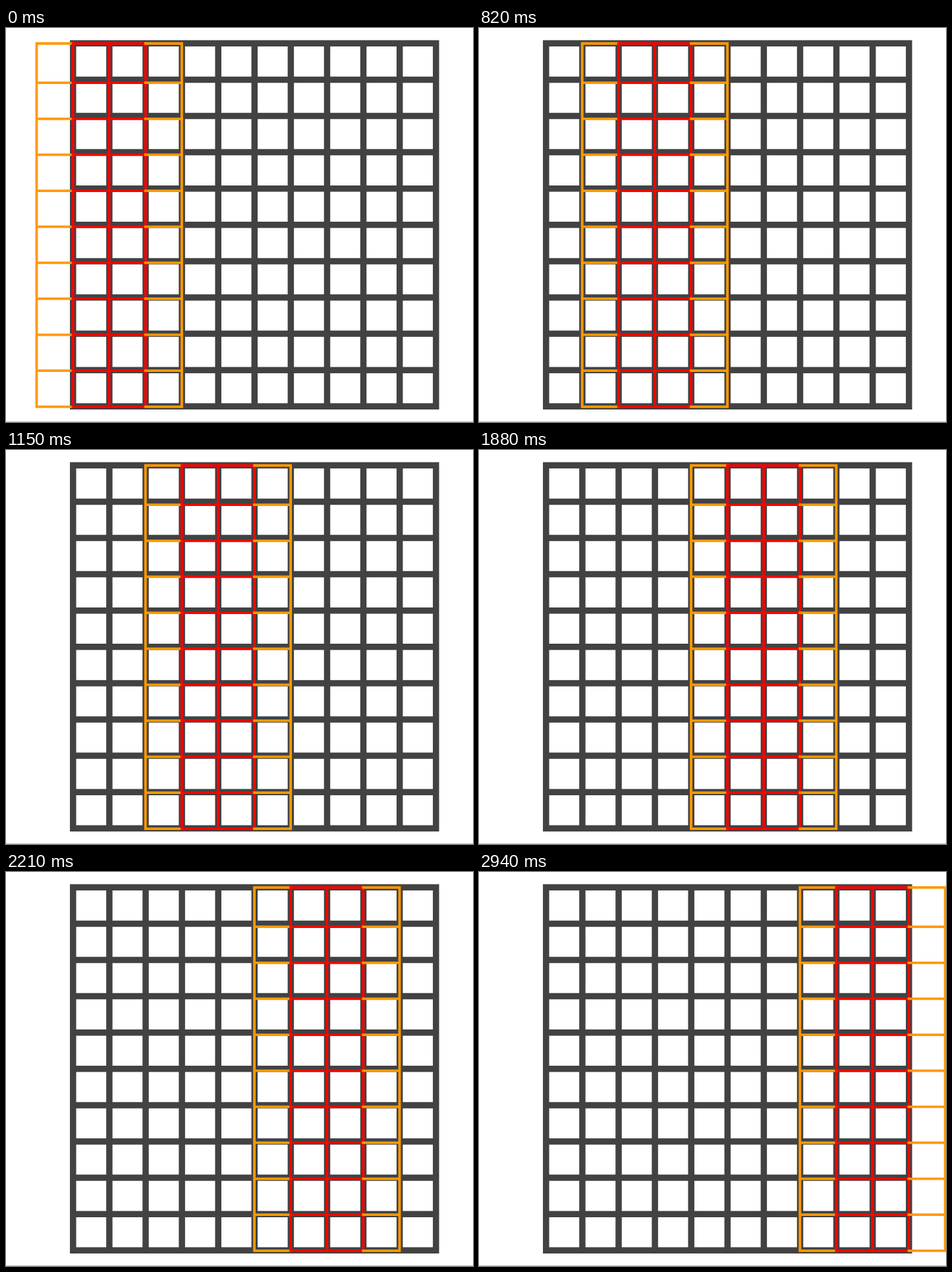
An HTML page that plays this animation: 709x598 px, repeating every 3540 ms.

```html
<!DOCTYPE html>
<html lang="en">
<head>
<meta charset="utf-8">
<title>Sliding columns on a grid</title>
<style>
  html, body { margin: 0; width: 100%; height: 100%; overflow: hidden; background: #fff; }
  svg { display: block; }
  path { fill: none; }
</style>
</head>
<body>
<svg width="709" height="598" viewBox="0 0 709 598">
  <rect y="597" width="709" height="1" fill="#c0c0c0"/>
  <path id="grid" stroke="#424242" stroke-width="9.5"/>
  <g id="cursor" stroke-width="3.8">
    <path id="left" stroke="#ff9900"/>
    <path id="middle" stroke="#ff0000"/>
    <path id="right" stroke="#ff9900"/>
  </g>
</svg>
<script>
{
  const STEP = 55.1, GRID_X = 101.8, GRID_Y = 23.3, CURSOR_X = 46.5, HALF = 1.9;
  const STARTS = [0, 550, 820, 1150, 1550, 1880, 2210, 2540, 2940];
  const LOOP = 3540;

  const byId = id => document.getElementById(id);
  const lines = Array.from({ length: 11 }, (_, i) => i);
  const across = (y, x1, x2) => `M${x1} ${y}H${x2}`;
  const down = (x, y1, y2) => `M${x} ${y1}V${y2}`;
  const draw = (id, parts) => byId(id).setAttribute('d', parts.join(''));

  const size = STEP * 10, edge = 4.75;
  draw('grid', lines.flatMap(i => [
    across(GRID_Y + i * STEP, GRID_X - edge, GRID_X + size + edge),
    down(GRID_X + i * STEP, GRID_Y - edge, GRID_Y + size + edge)
  ]));

  // The top row of the cursor is taller than the others.
  const rows = lines.map(i => i ? 83.2 + (i - 1) * 54.62 : 23.5);
  const railTop = rows[0] - HALF, railBottom = rows[10] + HALF;
  const column = i => i * STEP;
  const rungs = (from, to) => rows.map(y => across(y, column(from) - HALF, column(to) + HALF));
  const rail = i => down(column(i), railTop, railBottom);

  draw('left', [...rungs(0, 1), rail(0)]);
  draw('middle', [...rungs(1, 3), rail(1), rail(2), rail(3)]);
  draw('right', [...rungs(3, 4), rail(4)]);

  const cursor = byId('cursor');
  const render = time => {
    const t = time % LOOP;
    const position = STARTS.filter(start => start <= t).length - 1;
    cursor.setAttribute('transform', `translate(${CURSOR_X + position * STEP} 0)`);
  };

  const begin = performance.now();
  const tick = () => {
    render(performance.now() - begin);
    requestAnimationFrame(tick);
  };
  tick();
}
</script>
</body>
</html>
```
